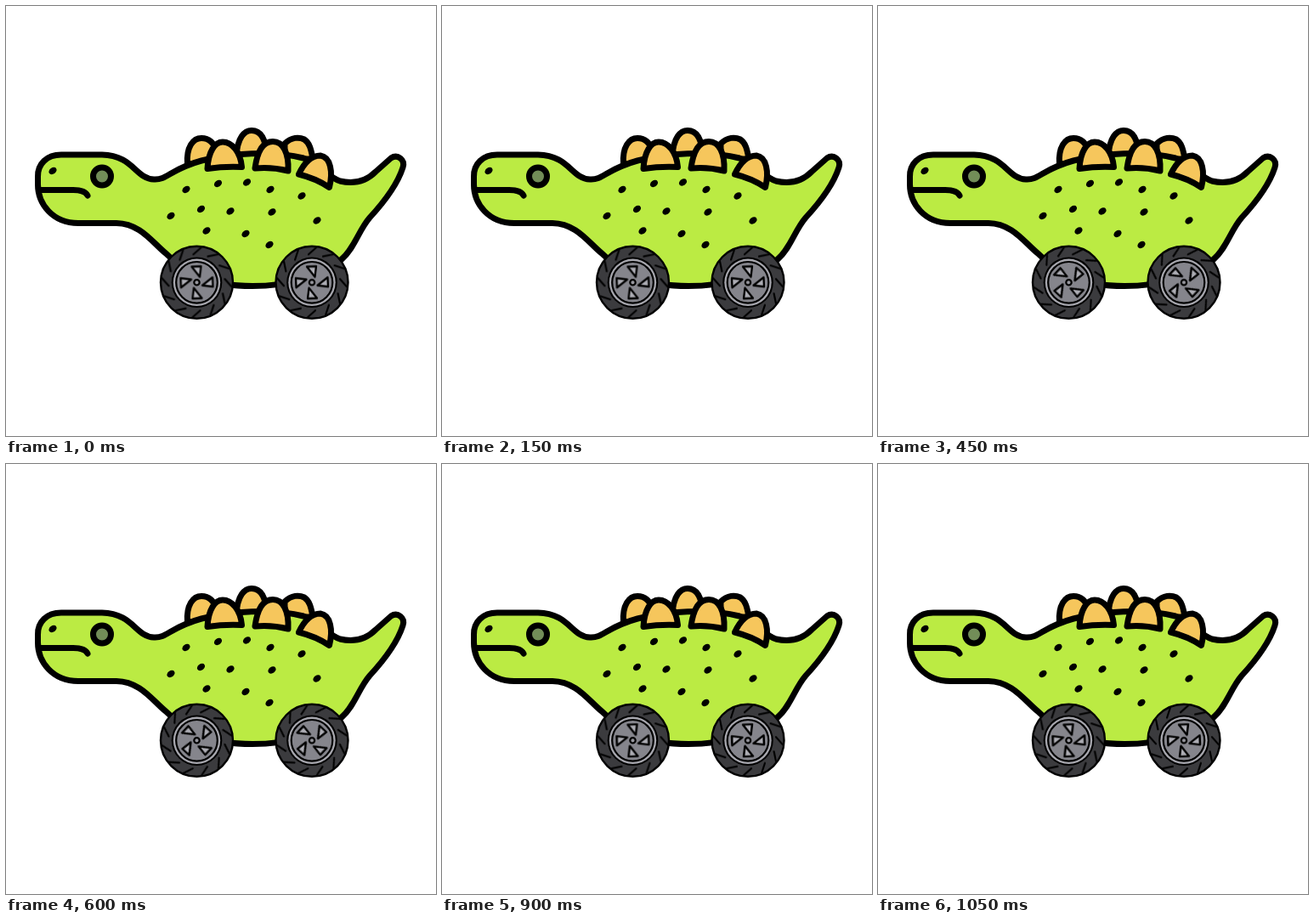
An HTML page without scripts that plays this animation: 506x506 px, repeating every 1.2 s.

```html
<!DOCTYPE html>
<html lang="en">
<head>
<meta charset="utf-8">
<title>Dinosaur on wheels</title>
<style>
  html, body { margin: 0; width: 100%; height: 100%; overflow: hidden; background: #fff; }
  svg { display: block; width: 100vw; height: 100vh; }
  .line { stroke: #000; stroke-width: 7; stroke-linecap: round; stroke-linejoin: round; }
  .skin { fill: #bbeb43; }
  .plate { fill: #f6c65c; }
  .bare { fill: none; }
  /* the small lead keeps each step clear of its 150 ms boundary */
  .spin { animation: roll 600ms steps(4, end) -8ms infinite; }
  @keyframes roll { to { transform: rotate(-180deg); } }
</style>
</head>
<body>
<svg viewBox="0 0 506 506">
  <defs>
    <ellipse id="spot" rx="5" ry="3.7" transform="rotate(-35)"/>

    <path id="tread" d="M-4 -33 L5 -41" stroke="#000" stroke-width="2.200" stroke-linecap="round"/>
    <path id="blade" d="M-6 -18.500 L5 -19 L3.500 -6.500 Z" fill="#adadb4" stroke="#000" stroke-width="2.300" stroke-linejoin="round"/>
    <g id="quarter">
      <use href="#tread"/>
      <use href="#tread" transform="rotate(30)"/>
      <use href="#tread" transform="rotate(60)"/>
      <use href="#blade"/>
    </g>

    <g id="wheel">
      <circle r="42.500" fill="#3b3b3e" stroke="#000" stroke-width="2.400"/>
      <circle r="29.800" fill="#000"/>
      <circle r="27.700" fill="#a6a6ad"/>
      <circle r="24.300" fill="#85858c" stroke="#000" stroke-width="2.200"/>
      <g class="spin">
        <use href="#quarter"/>
        <use href="#quarter" transform="rotate(90)"/>
        <use href="#quarter" transform="rotate(180)"/>
        <use href="#quarter" transform="rotate(270)"/>
      </g>
      <circle r="3.200" fill="#96969d" stroke="#000" stroke-width="2.200"/>
    </g>
  </defs>

  <!-- far plates -->
  <g class="line plate">
    <path d="M213.500 186 C212 166 220 155.500 230 155.500 C239 155.500 245 161 248 172 L248 186 Z"/>
    <path d="M271 178 C272 154 281 146.500 289 146.500 C298 146.500 306 154 307 178 Z"/>
    <path d="M328 162 C336 154 345 154 351 157 C357 161 359 168 361 180 L328 180 Z"/>
  </g>

  <path class="line skin" d="M65 175 H113 C150 176 152 203 174 204 C190 205 193 192 230 182
    C262 173 315 170 350 179 C370 186 378 201 393 206 C410 210 424 206 435 195
    L453 179 C461 174 470 181 467 190 C460 212 440 236 428 249
    C415 264 410 285 395 298 C370 320 330 329.500 290 329.500 C240 329.500 215 318 188 291
    C172 278 158 256 130 255.500 H85 C55 255.500 37.500 233 37.500 210 V201 C37 186 48 175 65 175 Z"/>

  <!-- near plates -->
  <g class="line plate">
    <path d="M237 191.500 C238 171 246 160 255 160 C266 160 276 172 277.500 189.500 Q257 188.500 237 191.500 Z"/>
    <path d="M293 191 C296 168 304 159.500 314 159.500 C326 159.500 333 173 332 194 Q312 189 293 191 Z"/>
    <path d="M344.500 198 C352 182 361 176 370 176 C382 178 385 195 380.500 213.500 Q365 203 344.500 198 Z"/>
  </g>

  <!-- face -->
  <path class="line bare" d="M39 216.500 H79 C89 216.500 94 219 96 223"/>
  <use href="#spot" x="55" y="194"/>
  <circle class="line" cx="113" cy="200.500" r="10.500" fill="#728d58"/>

  <g>
    <use href="#spot" x="212" y="216"/>
    <use href="#spot" x="249.500" y="209"/>
    <use href="#spot" x="283.500" y="207.500"/>
    <use href="#spot" x="311" y="216"/>
    <use href="#spot" x="348" y="223.500"/>
    <use href="#spot" x="194" y="247"/>
    <use href="#spot" x="229.500" y="239"/>
    <use href="#spot" x="264" y="241.500"/>
    <use href="#spot" x="313" y="242.500"/>
    <use href="#spot" x="366" y="252.500"/>
    <use href="#spot" x="236" y="264.500"/>
    <use href="#spot" x="282" y="268"/>
    <use href="#spot" x="310" y="281"/>
  </g>

  <use href="#wheel" x="224.500" y="325.300"/>
  <use href="#wheel" x="360" y="325.300"/>
</svg>
</body>
</html>
```
